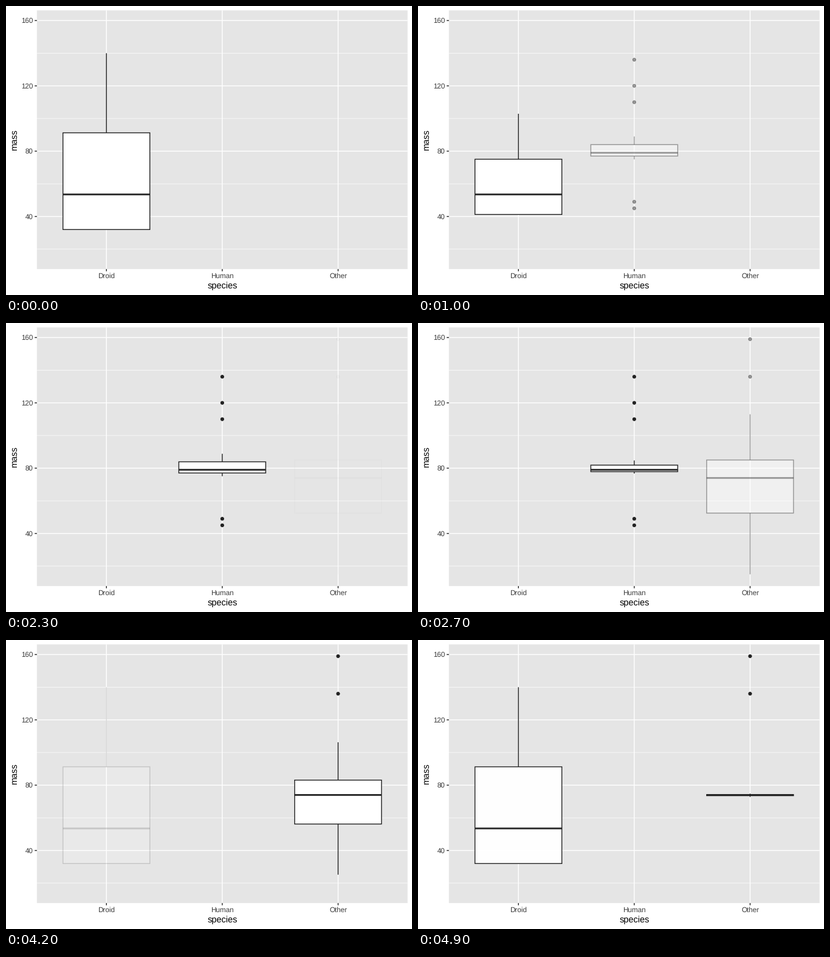
A matplotlib script that plays this animation: 672 by 480 pixels, repeating every 5 s.

```python
import math

import matplotlib.pyplot as plt
from matplotlib.animation import FuncAnimation
from matplotlib.patches import Circle, Rectangle

W, H, DPI = 672, 480, 96
FRAMES, INTERVAL = 50, 100
LEFT, RIGHT, TOP, BOTTOM = 51.2, 664.67, 7.33, 436.9
Y_MIN, Y_MAX = 7.8, 166.2
LINE = 1.42
PANEL, INK, LABEL = "#e5e5e5", "#222222", "#3c3c3c"

NAMES = ["Droid", "Human", "Other"]
# low whisker, lower quartile, median, upper quartile, high whisker
STATS = [
    (32, 32, 53.5, 91.25, 140),
    (75, 77, 79, 84, 89),
    (15, 52.5, 74, 85, 113),
]
OUTLIERS = [(), (45, 49, 110, 120, 136), (136, 159)]

# Each cycle holds a state, then takes STEPS frames to reach the next one.
FIRST, PERIOD, STEPS = 5, 17, 11

plt.rcParams["font.family"] = "Liberation Sans"
plt.rcParams["text.hinting"] = "none"
plt.rcParams["path.snap"] = False

fig = plt.figure(figsize=(W / DPI, H / DPI), dpi=DPI, facecolor="white")
ax = fig.add_axes([0, 0, 1, 1])
ax.set_xlim(0, W)
ax.set_ylim(H, 0)
ax.axis("off")

UNIT = (RIGHT - LEFT) / 3.2


def x_pos(i):
    return LEFT + (i + 0.6) * UNIT


def y_pos(mass):
    return BOTTOM - (mass - Y_MIN) / (Y_MAX - Y_MIN) * (BOTTOM - TOP)


def pt(px):
    return px * 72 / DPI


def line(xs, ys, color, width, z):
    (artist,) = ax.plot(xs, ys, color=color, lw=pt(width), zorder=z,
                        solid_capstyle="butt")
    return artist


def label(x, y, text, size, color, ha="center", rotation=0):
    ax.text(x, y, text, fontsize=size, color=color, ha=ha, va="baseline",
            rotation=rotation, rotation_mode="anchor")


def draw_axes():
    ax.add_patch(Rectangle((LEFT, TOP), RIGHT - LEFT, BOTTOM - TOP,
                           fc=PANEL, lw=0, zorder=0))
    for mass in (20, 60, 100, 140):
        line([LEFT, RIGHT], [y_pos(mass)] * 2, "white", LINE / 2, 1)
    for mass in (40, 80, 120, 160):
        y = y_pos(mass)
        line([LEFT, RIGHT], [y, y], "white", LINE, 1)
        line([LEFT - 3.67, LEFT], [y, y], INK, LINE, 1)
        label(LEFT - 6.6, y + 4.2, str(mass), 8.8, LABEL, ha="right")
    for i, name in enumerate(NAMES):
        x = x_pos(i)
        line([x, x], [TOP, BOTTOM], "white", LINE, 1)
        line([x, x], [BOTTOM, BOTTOM + 3.67], INK, LINE, 1)
        label(x, 451.9, name, 8.8, LABEL)
    label((LEFT + RIGHT) / 2, 469.2, "species", 11, "black")
    label(17.8, (TOP + BOTTOM) / 2, "mass", 11, "black", rotation=90)


class BoxPlot:
    def __init__(self, i):
        self.stats = STATS[i]
        x, half = x_pos(i), 0.375 * UNIT
        self.dots = [
            ax.add_patch(Circle((x, y_pos(m)), 2.6, fc=INK, ec=INK,
                                lw=pt(0.945), zorder=2))
            for m in OUTLIERS[i]
        ]
        self.whiskers = [line([x, x], [0, 0], INK, LINE, 3) for _ in range(2)]
        self.box = ax.add_patch(Rectangle((x - half, 0), 2 * half, 0,
                                          fc="white", ec=INK, lw=pt(LINE),
                                          joinstyle="miter", zorder=4))
        mid = y_pos(self.stats[2])
        self.median = line([x - half, x + half], [mid, mid], INK, 2 * LINE, 5)
        self.parts = self.dots + self.whiskers + [self.box, self.median]

    def show(self, alpha, scale):
        """Set the opacity, and the spread around the median."""
        median = self.stats[2]
        low, q1, _, q3, high = (y_pos(median + (v - median) * scale)
                                for v in self.stats)
        self.whiskers[0].set_ydata([high, q3])
        self.whiskers[1].set_ydata([q1, low])
        self.box.set_y(q3)
        self.box.set_height(q1 - q3)
        for part in self.parts:
            part.set_visible(alpha > 0)
            part.set_alpha(alpha)


def update(frame):
    cycle, step = divmod((frame - FIRST) % FRAMES, PERIOD)
    t = min(step / STEPS, 1)
    eased = (1 - math.cos(math.pi * t)) / 2
    for i, plot in enumerate(plots):
        if i == cycle and t < 1:
            plot.show(1, 1 - eased)
        elif i == (cycle + 1) % 3:
            plot.show(eased, 1)
        else:
            plot.show(0, 1)
    return [part for plot in plots for part in plot.parts]


draw_axes()
plots = [BoxPlot(i) for i in range(3)]
anim = FuncAnimation(fig, update, frames=FRAMES, interval=INTERVAL,
                     repeat=True, repeat_delay=0, blit=False)
plt.show()
```
